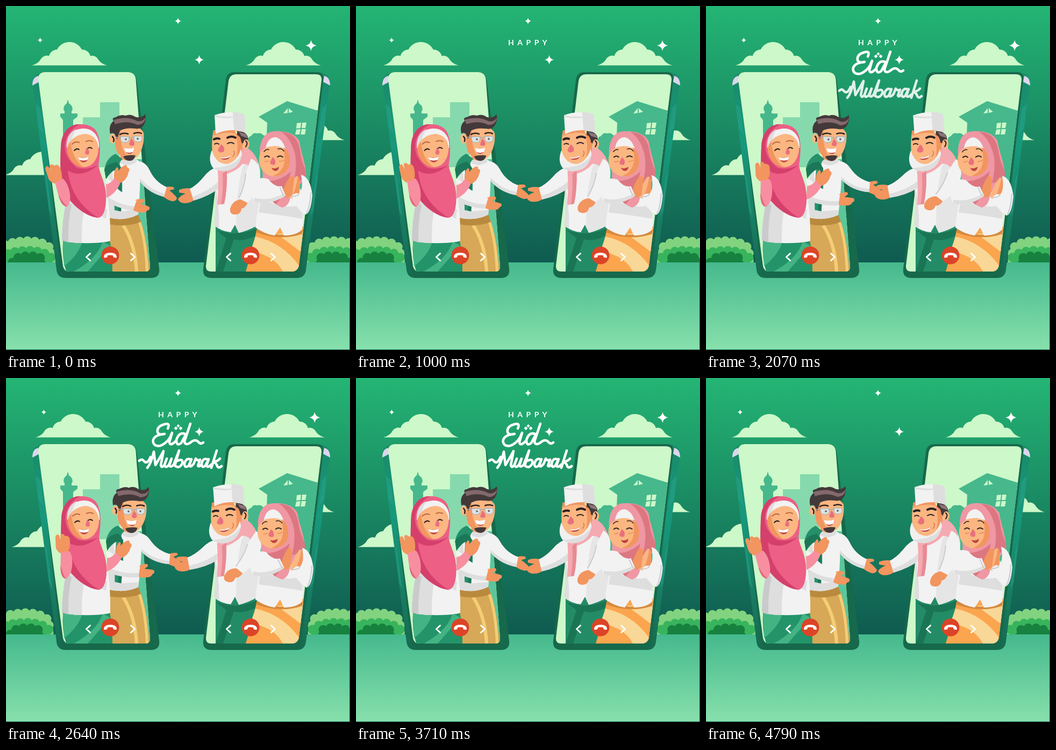
Animation of 640x640 px, one loop 4870 ms. Source, as an HTML page:

```html
<!DOCTYPE html>
<html lang="en">
<meta charset="utf-8">
<title>Happy Eid Mubarak</title>
<style>
html,body{margin:0;height:100%;overflow:hidden;background:#0f5c50}
svg{display:block;width:100vw;height:100vh}
.w{fill:#f2f2f2}.g{fill:#dedede}.s{fill:#fbb681}.o{fill:#f2955f}.c{fill:#cdf8c9}.t{fill:#46b88c}
.red{fill:#bf4440}.nose{fill:#e8707c}.rose{fill:#f78fa0}.pale{fill:#f5a9b0}.hair{fill:#43393a}
.k,.b,.line{fill:none;stroke:#2b2022;stroke-width:2;stroke-linecap:round;stroke-linejoin:round}
.b{stroke-width:2.500}.line{stroke:#fff;stroke-width:4.600}
.fold{fill:none;stroke:#cbcbcf;stroke-width:2;stroke-linecap:round}
.scallop path{stroke-width:17;stroke-linecap:round;stroke-dasharray:0 14}
</style>
<svg viewBox="0 0 640 640">
<defs>
<linearGradient id="sky" x2="0" y2="1"><stop stop-color="#24b574"/><stop offset="1" stop-color="#0f5b50"/></linearGradient>
<linearGradient id="ground" x2="0" y2="1"><stop stop-color="#45b98d"/><stop offset="1" stop-color="#87e0ac"/></linearGradient>
<linearGradient id="side" x2="0" y2="1"><stop stop-color="#1a8a69"/><stop offset=".35" stop-color="#17997c"/><stop offset="1" stop-color="#17694f"/></linearGradient>
<path id="star" d="M0-10Q1.5-1.5 10 0Q1.5 1.5 0 10Q-1.5 1.5-10 0Q-1.5-1.5 0-10Z" fill="#fff"/>
<path id="cloud" class="c" d="M48 110.500Q60 107 64 100A13 13 0 0 1 80 93A16 16 0 0 1 95 81A26 26 0 0 1 141 81A16 16 0 0 1 157 93A13 13 0 0 1 172 100Q176 107 188 110.500Z"/>
<g id="bush" class="scallop"><g data-m="-4 0">
<path d="M-12 480V450Q10 437 42 437Q72 438 84 452V480" fill="#82d37f" stroke="#82d37f"/>
<path d="M-10 480V466Q12 455 42 455Q74 456 86 470V480" fill="#38b45d" stroke="#38b45d"/>
<path d="M12 477Q18 465 43 465Q68 465 74 477" fill="#17813f" stroke="#17813f"/>
</g></g>
<g id="phone">
<path d="M575 123Q603 124 603 142L558 491Q556 506 541 506H385Z" fill="url(#side)"/>
<path d="M592 130Q603 132 603 148L590 141Z" fill="#dcd5ee"/>
<path d="M588 190L597 182L592 225L582 240ZM576 320L580 310L572 380L566 392Z" fill="#2ba389" opacity=".5"/>
<path d="M425 123H578Q592 123 590 138L550 490Q548 506 532 506H383Q365 506 367 489L409 138Q411 123 425 123Z" fill="#17694b"/>
</g>
<path id="screenL" d="M72 123H228Q240 124 241.500 136L268 484Q269 494 259 494H118Q108 494 106 484L60 137Q59 124 72 123Z"/>
<path id="screenR" d="M429 127H576Q588 127 587 138L545 482Q543 494 531 494H382Q371 494 372 483L414 140Q416 127 429 127Z"/>
<clipPath id="clipL"><use href="#screenL"/></clipPath>
<clipPath id="clipR"><use href="#screenR"/></clipPath>
<g id="call">
<circle r="16.500" fill="#dc4427"/>
<path d="M-12 2Q-11-5 0-5T12 2Q12 5 10 4.500L6 3.500Q5 3 5 0Q0-1-5 0Q-5 3-6 3.500L-10 4.500Q-12 5-12 2Z" fill="#fff"/>
<path class="line" style="stroke-width:3" d="M-37.500-3.500L-44.500 3L-37.500 9.500M38.500-3.500L45.500 3L38.500 9.500"/>
</g>
</defs>

<rect width="640" height="477" fill="url(#sky)"/>
<use href="#star" transform="translate(320 28)scale(.6)"/>
<use href="#star" transform="translate(359.500 100)scale(.85)"/>
<g data-m="7 0">
<use href="#star" transform="translate(63.500 63.500)scale(.5)"/>
<use href="#star" transform="translate(567.500 73.500)"/>
<use href="#cloud"/><use href="#cloud" x="398"/>
</g>
<use href="#cloud" x="-50" y="204" data-m="13 0"/>
<use href="#cloud" x="442" y="139" data-m="-20 0"/>
<use href="#bush"/><use href="#bush" transform="matrix(-1 0 0 1 650 0)"/>
<rect y="477" width="640" height="163" fill="#0f5c50"/>
<rect y="477" width="639" height="162" fill="url(#ground)"/>
<use href="#phone" transform="matrix(-1 0 0 1 652 0)"/><use href="#phone"/>
<use href="#screenL" class="c"/><use href="#screenR" class="c"/>

<g clip-path="url(#clipL)">
<path d="M143 207H175V179H211V300H143Z" fill="#86d9ad"/>
<path d="M236 285H256L271 494H236Z" fill="#5cc69b"/>
<path class="t" d="M115 174L117 181Q126 187 123 195H122V200H133V206L125 212V260H106V212L101 206V200H109V195H108Q105 187 113 181Z"/>
<path d="M192 396Q220 400 246 390Q262 420 267 494H196Q190 440 192 396Z" fill="#d6a857"/>
<path d="M192 394Q220 400 246 388L251 402Q222 412 192 406Z" fill="#b98a3e"/>
<path d="M215 409Q236 440 240 494H246Q244 445 222 408ZM246 403Q258 440 260 494H265Q263 440 251 402Z" fill="#f4cd75"/>
<path d="M106 436H193Q198 460 198 494H112Q104 470 106 436Z" fill="#23946a"/>
<path d="M106 438H142Q136 462 108 484ZM194 446L152 494H126Q170 470 180 438Z" fill="#44b384"/>
</g>
<g clip-path="url(#clipR)">
<path class="t" d="M450 252Q449 243 456 242Q460 235 467 237Q475 235 478 240L485 243L486 217L470 206L523 177L590 198V360H450Z"/>
<path class="c" d="M516 200L524 190V199ZM526 190L534 197L526 199ZM541 218L549 217L548 227L540 228ZM551 217L559 217L557 227L550 227ZM540 230L548 229L546 239L538 239ZM550 229L558 229L556 239L548 239Z"/>
<path d="M390 405H470L462 494H390Z" fill="#238c66"/>
<path d="M390 416Q430 432 470 412L468 426Q440 440 424 434L404 494H390L410 432Z" fill="#1a7555"/>
<path d="M468 410H554L545 494H446Q458 455 468 410Z" fill="#fba54e"/>
<path d="M464 429Q515 440 546 484L543 494H515Q500 464 455 456ZM504 424L552 460V420Z" fill="#f9d796"/>
<path d="M467 414Q510 436 552 416L551 424Q510 438 465 421Z" fill="#d68a3d"/>
</g>

<!-- husband -->
<g data-m="0 0 -10 247 295">
<path class="o" d="M291 339Q300 334 312 337L313 341L304 343Q313 350 318 357Q317 364 308 363Q298 360 290 352Z"/>
<path class="w" d="M236 290Q257 284 267 305Q277 327 299 337L294 355Q262 347 246 320Z"/>
<path class="g" d="M247 317Q266 342 295 349L294 355Q262 347 246 322Z"/>
</g>
<g data-m="0 0 2 220 392">
<path class="w" d="M196 290Q212 284 226 288Q240 280 249 290Q251 335 246 388Q220 401 192 394Q186 340 196 290Z"/>
<path class="g" d="M192 394Q186 340 196 290Q200 350 216 382L246 379L246 388Q220 401 192 394Z"/>
<path class="o" d="M213 268H239V285Q226 292 213 284Z"/>
<path class="g" d="M209 279Q226 295 242 282L243 290Q226 302 209 290Z"/>
<path class="s" d="M202 236Q204 226 226 224Q250 222 256 236Q258 256 250 272Q244 285 230 286Q214 284 206 270Q202 256 202 236Z"/>
<path class="o" d="M202 236Q202 256 206 270Q214 284 230 286Q216 272 214 250L213 232Z"/>
<ellipse class="s" cx="198" cy="247" rx="5.500" ry="9"/>
<path class="b" d="M198 243Q202 247 200 252"/>
<path class="hair" d="M194 238Q190 222 200 214Q196 208 204 207Q214 201 222 204Q232 200 240 206Q252 210 259 201Q262 212 256 222Q250 230 240 228Q222 226 212 232Q209 240 207 248L202 238Q198 235 194 238Z"/>
<path d="M200 212Q226 204 244 214Q254 216 260 207Q258 221 244 221Q226 212 203 220Z" fill="#83696d"/>
<path class="b" d="M212 239Q219 235 227 238M238 237Q246 234 252 237"/>
<path d="M213 243H229V249Q228 254 221 254Q213 254 213 247ZM238 242H253V248Q252 253 246 253Q239 253 238 248Z" fill="#dbe3e4" stroke="#a6abae"/>
<path class="k" style="stroke:#a6abae;stroke-width:1.500" d="M204 244L213 245M229 245L238 244"/>
<circle cx="223" cy="248" r="1.800" fill="#665c5c"/><circle cx="245" cy="247" r="1.800" fill="#665c5c"/>
<path class="nose" d="M233 246Q241 254 238 259Q232 262 229 257Z"/>
<path class="red" d="M219 264Q230 267 239 263Q238 275 229 275Q222 274 219 264Z"/>
<path d="M219 264Q230 267 239 263L237 271Q228 275 222 271Z" fill="#fff"/>
<path class="hair" d="M218 280Q229 276 241 278Q238 288 230 288Q222 288 218 280Z"/>
<path d="M183 304Q187 282 204 275L217 285Q207 292 215 302Q218 340 214 382L202 380Q200 340 202 305Q194 310 186 322Z" fill="#25906a"/>
<path d="M183 304Q190 292 206 290L215 302L214 382L208 381Q212 340 206 304Q194 306 186 322Z" fill="#1b7757"/>
<g data-m="0 0 -14 195 335">
<path class="o" d="M237 363Q246 357 257 360L258 364L250 368Q262 371 267 374Q268 380 263 380Q260 386 252 384Q242 384 234 378Z"/>
<path class="w" d="M186 322Q194 320 203 336Q220 352 243 362L236 381Q206 376 188 362Z"/>
<path class="g" d="M188 354Q210 370 239 373L236 381Q206 376 188 364Z"/>
</g>
</g>

<!-- wife -->
<path class="w" d="M112 360Q104 400 104 436Q120 442 160 441Q185 440 194 437Q195 390 188 350Z"/>
<path class="g" d="M112 360Q104 400 104 436Q120 441 141 441Q140 405 146 375L186 396L188 378Z"/>
<path d="M112 365Q104 400 104 436L116 440Q115 400 122 370Z" fill="#cacacc"/>
<g data-m="1 0">
<path d="M138 220C118 219 103 235 102 262C101 290 100 315 106 340C118 368 148 392 172 394C184 392 187 370 186 350C184 325 174 312 172 296C176 270 177 245 166 230C158 222 148 220 138 220Z" fill="#ed5f84"/>
<path d="M138 220C118 219 103 235 102 262C101 290 100 315 106 340C118 368 148 392 172 394C142 376 119 348 115 306Q140 322 171 296Q150 306 132 301C112 285 108 270 110 255C114 235 128 224 138 220Z" fill="#d4406b"/>
<path class="w" d="M113 264C111 240 128 227 146 228C164 229 175 245 173 264Z"/>
<path class="g" d="M113 264C111 245 120 233 131 229Q120 244 121 264Z"/>
<path class="s" d="M114 264C116 250 130 240 146 238C160 238 171 248 172 264C172 285 160 300 144 300C126 299 114 282 114 264Z"/>
<path class="o" d="M114 264C114 282 126 299 144 300Q124 286 120 252Z"/>
<path class="k" d="M127 269Q131 264 136 267M151 266Q155 261 160 265"/>
<path class="k" style="stroke:#b9683f" d="M123 257Q129 251 136 254M149 252Q155 249 161 252"/>
<path class="nose" d="M150 263Q157 270 154 276Q148 278 147 273Z"/>
<path class="red" d="M134 281Q144 284 154 280Q152 291 144 291Q137 290 134 281Z"/>
<path d="M134 281Q144 285 154 280L152 286Q144 289 136 286Z" fill="#fff"/>
</g>
<g data-m="0 0 17 110 364">
<path class="o" d="M93 331Q80 328 78 318L73 303Q74 296 79 299L84 306L81 297Q84 292 90 297Q98 292 102 305Q106 318 103 329Z"/>
<path class="rose" d="M91 328Q99 326 106 321Q116 330 119 350Q121 366 114 373Q104 374 98 354Z"/>
<path d="M98 352Q106 366 114 373Q104 374 98 354Z" fill="#e2667f"/>
</g>
<g data-m="1 4 5 195 345">
<path class="rose" d="M186 332Q197 330 203 317L213 328Q206 348 187 357Z"/>
<path class="o" d="M201 320Q200 306 206 300Q210 300 209 307Q215 298 222 296Q226 296 225 300Q232 302 228 309Q225 324 213 329Z"/>
</g>

<!-- grandfather -->
<g data-m="0 0 -.8 425 405">
<path class="w" d="M386 306Q396 296 410 300Q440 290 455 276Q472 284 473 310Q472 360 468 408Q450 418 433 422L426 407L418 421Q400 419 387 408Q392 350 386 306Z"/>
<path d="M440 300Q428 350 428 411L433 422Q450 418 468 408Q472 360 473 310Q470 284 456 278Z" fill="#e5e5e5"/>
<path class="g" d="M387 408Q391 370 389 330Q398 380 396 413Z"/>
<path class="pale" d="M438 262Q458 262 469 290Q468 302 462 308Q452 292 440 294Q430 306 412 312L394 314Q390 306 394 300Q426 300 438 280Z"/>
<g data-m="1.5 0 8 392 300">
<path class="o" d="M346 340Q334 337 322 342L322 347L334 349Q322 354 320 360Q324 367 332 367Q344 367 351 360Z"/>
<path class="w" d="M400 296Q378 303 366 320Q354 334 342 340L349 362Q378 353 398 336Z"/>
<path class="g" d="M347 355Q378 344 398 324V338Q378 354 349 362Z"/>
</g>
<path class="pale" d="M394 306L411 304Q412 340 406 368L393 370Q396 336 394 306Z"/>
<path d="M403 312Q405 340 400 369L406 368Q412 340 411 306Z" fill="#e88a94"/>
<path class="s" d="M385 236Q382 256 384 274Q390 296 408 297Q428 294 436 278Q442 262 441 236Z"/>
<path class="o" d="M426 232Q434 256 429 282L439 270Q443 250 441 236ZM385 232Q412 222 441 236L440 241Q412 231 386 241Z"/>
<path d="M383 268Q375 288 385 301Q400 311 416 305Q434 300 439 276L437 266Q430 290 411 294Q390 294 383 268Z" fill="#f0f0f0"/>
<path class="g" d="M385 301Q400 311 416 305Q434 300 439 276Q426 300 385 301Z"/>
<path class="hair" d="M430 233Q446 232 450 244L451 252L444 258L438 254Q437 242 430 240Z"/>
<path d="M433 234L446 238L450 246L438 242Z" fill="#8b7579"/>
<ellipse class="s" cx="447" cy="257" rx="6" ry="9"/>
<path class="k" d="M446 251Q451 255 446 262"/>
<path class="b" style="stroke-width:4" d="M387 248Q392 245 397 247M412 245Q420 241 427 245"/>
<path class="k" d="M388 257Q392 254 396 257M412 256Q418 252 424 256"/>
<path class="nose" d="M400 257Q409 264 405 271Q397 275 394 268Z"/>
<path class="red" d="M397 281Q409 284 418 277Q416 286 407 286Q401 286 397 281Z"/>
<path d="M397 281Q409 284 418 277L416 281Q408 285 399 283Z" fill="#fff"/>
<path class="k" style="stroke:#d97746;stroke-width:1.500" d="M424 270Q427 275 422 280"/>
<path class="w" d="M388 203Q416 193 444 202L446 236Q418 225 390 238Z"/>
<path class="g" d="M422 197Q436 198 444 202L446 236Q436 231 424 231ZM388 203Q416 209 444 202Q416 213 388 206Z"/>
<g data-m="0 0 14 456 330">
<path class="o" d="M434 360Q448 358 449 367Q445 376 438 377Q437 388 426 388Q416 388 417 377Q420 364 434 360Z"/>
<path class="w" d="M456 284Q474 290 472 322Q466 352 449 366L433 358Q443 338 446 310Z"/>
<path class="fold" d="M446 312Q444 336 434 356"/>
</g>
</g>

<!-- grandmother -->
<path class="w" d="M478 340Q466 380 464 412Q480 424 500 427L510 412L517 427Q540 427 551 416Q556 380 548 340Z"/>
<path class="g" d="M476 352Q500 378 540 372L552 386L551 396Q520 390 470 384Z"/>
<g data-m="0 0 -1.300 508 420">
<path d="M500 233C482 233 472 250 472 272C474 296 482 312 474 334Q490 366 514 375Q528 372 530 350Q546 334 558 318C560 300 548 270 546 252C538 236 518 232 500 233Z" fill="#ef97a3"/>
<path d="M512 234C538 236 545 252 548 275C552 300 561 305 558 318Q546 328 534 330Q545 290 534 264Q527 244 512 234ZM476 324Q506 330 530 308Q522 348 502 369Q484 356 474 334Z" fill="#dc7781"/>
<path class="w" d="M483 266Q486 244 502 244Q516 248 521 270Z"/>
<path class="s" d="M471 288Q470 268 488 262Q513 256 525 273Q531 292 523 306Q508 320 492 316Q472 309 471 288Z"/>
<path class="o" d="M516 263Q522 266 526 275Q531 292 523 306Q510 319 496 316Q526 306 516 263Z"/>
<path class="k" d="M481 281Q486 277 490 281M505 281Q510 277 515 281"/>
<path class="k" style="stroke-width:1.500" d="M480 271Q484 266 489 267M506 266Q513 264 517 270"/>
<path class="nose" d="M496 281Q504 288 500 295Q493 297 491 291Z"/>
<path class="red" d="M494 301Q501 304 508 299Q507 307 501 307Q496 306 494 301Z"/>
<path class="k" style="stroke:#d97746;stroke-width:1" d="M482 289Q486 291 489 288M508 289Q513 290 517 287"/>
</g>
<g data-m="4 3 3 550 380">
<path class="s" d="M523 354Q529 330 539 317Q546 315 546 325Q548 342 544 354L533 359Z"/>
<path class="o" d="M532 358Q540 338 543 317Q547 319 546 328Q548 342 544 354Z"/>
</g>
<g data-m="2 2">
<path class="w" d="M549 314Q566 318 570 352Q567 386 557 388Q540 376 531 354Q538 346 545 349Q554 340 549 314Z"/>
<path class="fold" d="M532 354Q540 355 545 350M559 386Q566 372 567 348"/>
</g>
<g data-m="-3 3 -3 470 345">
<path class="o" d="M513 352Q516 335 528 318Q536 313 536 324L532 352Q522 360 513 352Z"/>
<path class="w" d="M460 328Q470 316 488 322Q500 338 513 335L520 353Q490 372 462 364Q453 346 460 328Z"/>
<path class="g" d="M462 357Q490 364 519 348L520 353Q490 372 462 364Z"/>
<path class="fold" d="M510 338Q513 346 516 352"/>
</g>

<use href="#call" x="194" y="464"/><use href="#call" x="455" y="464"/>

<!-- greeting -->
<text data-in="300" x="283" y="73" fill="#fff" font-family="Lato,sans-serif" font-weight="700" font-size="14" letter-spacing="6.500">HAPPY</text>
<g data-in="1000" class="line" role="img" aria-label="Eid">
<path d="M301 94Q306 83 295 86Q280 90 282 101Q285 107 295 104Q274 106 273.500 118Q275 128 287 126Q298 122 305 111L309 102L304 119Q305 128 315 118M333 104Q322 100 317 115Q317 128 326 121L334 106M343 85L332 118Q333 126 342 121Q352 112 358 119Q362 124 367 120"/>
<path fill="#fff" stroke="none" d="M316 90l3.500 3.500l-3.500 3.500l-3.500-3.500ZM325 90l3.500 3.500l-3.500 3.500l-3.500-3.500ZM320.500 86l3 3l-3 3l-3-3Z"/>
</g>
<path data-in="1900" class="line" role="img" aria-label="Mubarak" d="M248 154Q253 149 257 155Q263 161 269 147M263 167Q270 159 275 137L278 162Q286 149 293 136L288 162Q290 169 295 161L299 150L295 161Q296 169 303 162L308 150L304 162Q306 168 312 161L322 135L314 163Q322 170 328 159Q330 149 319 154M344 152Q336 147 332 159Q332 169 340 163L345 151L341 163Q343 167 349 160L353 150Q356 155 361 152L357 163Q359 167 364 160M376 152Q367 147 364 159Q364 169 371 163L377 151L373 163Q375 168 382 161M392 135L382 167M398 150Q394 155 386 156Q392 159 393 164Q396 169 401 164"/>
</svg>
<script>
const LOOP = 4870, FPS = 14, LAST = 67;
const clamp = v => Math.max(0, Math.min(1, v));
const movers = [...document.querySelectorAll('[data-m]')].map(el => [el, ...el.dataset.m.split(' ').map(Number)]);
const words = [...document.querySelectorAll('[data-in]')];

function draw(now) {
  const step = Math.min(LAST, Math.floor((now % LOOP + 5) * FPS / 1000));
  const time = step * 1000 / FPS;
  const sway = (1 - Math.cos(2 * Math.PI * step / LAST)) / 2;
  for (const [el, dx, dy, turn = 0, cx = 0, cy = 0] of movers)
    el.setAttribute('transform', `translate(${dx * sway} ${dy * sway})rotate(${turn * sway} ${cx} ${cy})`);
  const out = clamp((4680 - time) / 300);
  for (const el of words) {
    const q = clamp((time - el.dataset.in) / 600);
    el.setAttribute('transform', `translate(0 ${10 * (1 - q) ** 3})`);
    el.setAttribute('opacity', Math.min(1, q * 3) * out);
  }
  requestAnimationFrame(draw);
}
draw(0);
</script>
</html>
```
